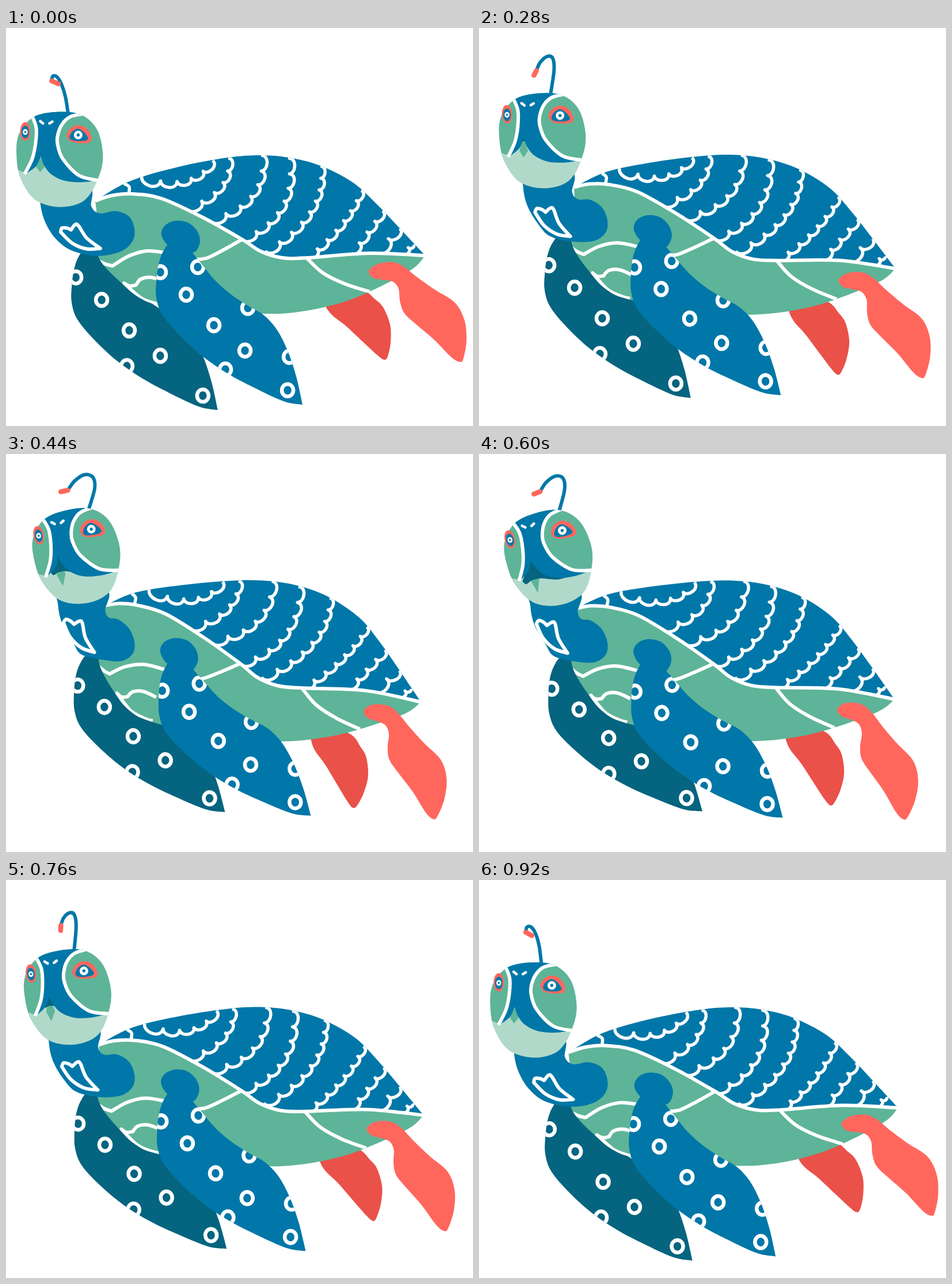
Write an HTML page with a canvas that moves like this. It is 811 by 691 pixels and loops after 960 ms.

```html
<!DOCTYPE html>
<html lang="en">
<head>
<meta charset="utf-8">
<title>Swimming turtle</title>
<style>
html, body { margin: 0; width: 100%; height: 100%; overflow: hidden; background: #fff; }
canvas { display: block; }
</style>
</head>
<body>
<canvas id="stage" width="811" height="691"></canvas>
<script>
const ctx = document.getElementById('stage').getContext('2d');
const LOOP = 960, STEP = 40;
const BLUE = '#0077a8', TEAL = '#05647f', GREEN = '#5eb498', MINT = '#b0d9ca',
      RED = '#ff675d', BRICK = '#ea5148', WHITE = '#fff';

// "x,y x,y | x,y ..." -> smooth runs of points, with corners between runs
const runs = s => s.split('|').map(r => r.trim().split(/\s+/).map(q => q.split(',').map(Number)));
const points = s => runs(s)[0];
const mapRuns = (shape, f) => shape.map(r => r.map(f));
const clamp = v => Math.max(0, Math.min(1, v));

// 0..1 swing that tops out at the given time; power narrows or widens the top
const wave = (t, peak, power = 1) => ((1 + Math.cos(2 * Math.PI * (t - peak) / LOOP)) / 2) ** power;

function trace(shape, closed) {
  const loop = closed && shape.length === 1;
  ctx.beginPath();
  shape.forEach((r, n) => {
    const last = r.length - 1;
    const at = i => loop ? r[(i + r.length) % r.length] : r[Math.max(0, Math.min(last, i))];
    if (n === 0) ctx.moveTo(...r[0]);
    for (let i = 0; i < (loop ? r.length : last); i++) {
      const [a, b, c, d] = [at(i - 1), at(i), at(i + 1), at(i + 2)];
      ctx.bezierCurveTo(b[0] + (c[0] - a[0]) / 6, b[1] + (c[1] - a[1]) / 6,
        c[0] - (d[0] - b[0]) / 6, c[1] - (d[1] - b[1]) / 6, c[0], c[1]);
    }
  });
  if (closed) ctx.closePath();
}
function fill(shape, color) { trace(shape, true); ctx.fillStyle = color; ctx.fill(); }
function line(shape, width = 6, color = WHITE, closed = false) {
  trace(shape, closed);
  ctx.lineWidth = width;
  ctx.strokeStyle = color;
  ctx.stroke();
}
function oval(x, y, rx, ry, color) {
  ctx.beginPath();
  ctx.ellipse(x, y, rx, ry, 0, 0, 7);
  ctx.fillStyle = color;
  ctx.fill();
}
function clipped(shape, draw) {
  ctx.save();
  trace(shape, true);
  ctx.clip();
  draw();
  ctx.restore();
}
// Draw in a frame where (x, y) moves to (tx, ty), turned by deg
function posed(x, y, tx, ty, deg, draw) {
  ctx.save();
  ctx.translate(tx, ty);
  ctx.rotate(deg * Math.PI / 180);
  ctx.translate(-x, -y);
  draw();
  ctx.restore();
}

// Body: everything on it is bent by one warp
const seam = points('155,300 183,291 220,288 270,296 340,328 410,367 443,388 480,399 523,399 630,391 728,395');
const back = points('728,395 684,348 642,304 602,268 548,240 497,226 445,221 385,225 300,241 215,266 155,300');
const keel = points('728,395 702,421 620,463 560,483 500,494 445,496 330,490 265,481 235,470 205,447 160,396 158,330 155,300');
const marks = [
  '160,404 173,410 185,413 | 185,413 213,396 245,387 283,391',
  '275,481 262,479 235,469 205,443 | 205,443 215,448 226,446 | 226,446 234,436 252,433 275,440',
  '330,402 350,399 378,385 410,367',
  '523,400 550,425 588,444 632,458'
].map(runs);
const nick = runs('205,270 214,276 213,289');
const shoulder = runs('270,360 275,344 292,335 314,337 331,351 337,369 331,386 318,391 300,385 282,378');
// Start, control and end of each row of scales
const rows = [
  '359,230 322,285 236,258', '386,226 392,285 311,313', '443,221 453,308 351,332',
  '490,226 506,326 409,366', '546,240 556,325 450,387', '617,282 590,345 522,399',
  '654,317 627,354 600,392', '684,348 662,362 648,391', '708,376 697,378 692,393'
].map(points);

function scales([a, c, b], bend) {
  const count = Math.max(2, Math.round(Math.hypot(a[0] - b[0], a[1] - b[1]) / 23));
  const at = u => bend([0, 1].map(i => (1 - u) ** 2 * a[i] + 2 * u * (1 - u) * c[i] + u * u * b[i]));
  let [px, py] = at(0);
  ctx.beginPath();
  ctx.moveTo(px, py);
  for (let i = 1; i <= count; i++) {
    const [x, y] = at(i / count), dx = (y - py) * .72, dy = (px - x) * .72;
    ctx.bezierCurveTo(px + dx * .8, py + dy * .8, x + dx * .6, y + dy * .6, x, y);
    [px, py] = [x, y];
  }
  ctx.lineWidth = 5.5;
  ctx.strokeStyle = WHITE;
  ctx.stroke();
}
function drawBody(p) {
  const bend = ([x, y]) => {
    const u = x - 445;
    return [x + p * .15 * (345 - y + Math.max(0, 220 - x)), y + p * (.092 * u + 4.2e-7 * u ** 3)];
  };
  const bent = s => mapRuns(s, bend);
  const shell = bent([seam, back]), belly = bent([seam, keel]);
  fill(belly, GREEN);
  fill(shell, BLUE);
  clipped(shell, () => rows.forEach(r => scales(r, bend)));
  clipped(belly, () => marks.forEach(m => line(bent(m))));
  line(bent(nick), 5.5);
  line(bent([seam]));
  fill(bent(shoulder), BLUE);
}

// Front flippers share one outline
const fin = runs('318,383 340,410 362,437 390,462 420,482 447,498 470,523 489,560 504,605 515,654 | 515,654 482,648 430,624 385,600 340,569 300,532 271,497 261,468 261,440 265,410 274,386 290,370 318,383');
const rings = points('268,424 313,463 361,516 415,560 489,629');
const nearRings = points('333,415 420,486 381,593 492,571');
const farRings = points('357,578');

function drawFin(extra, color) {
  fill(fin, color);
  clipped(fin, () => {
    ctx.lineWidth = 6.5;
    ctx.strokeStyle = WHITE;
    for (const [x, y] of [...rings, ...extra]) {
      ctx.beginPath();
      ctx.ellipse(x, y, 10, 10.8, 0, 0, 7);
      ctx.stroke();
    }
  });
}

// Hind legs
const nearLeg = runs('630,422 645,410 670,406 690,413 712,430 745,453 780,475 797,505 801,540 796,572 790,578 775,570 745,540 715,515 693,495 685,475 682,452 672,440 655,437 638,434');
const farLeg = runs('553,470 556,485 568,500 590,517 620,545 645,568 657,576 663,570 668,545 667,515 655,485 640,470 620,455 580,450');

// The hip end stays level while the rest swings
function drawNearLeg(p, kick) {
  const swing = ([x, y]) => {
    const dx = x - 630, dy = y - 422;
    const a = kick * .264 * clamp(Math.hypot(dx, dy) / 58), c = Math.cos(a), s = Math.sin(a);
    return [630 - 9 * p + dx * c - dy * s, 422 + 24 * p + dx * s + dy * c];
  };
  fill(mapRuns(nearLeg, swing), RED);
}

// Neck
const neck = runs('62,270 59,300 66,333 85,365 115,387 160,396 200,388 220,370 223,348 213,327 190,318 163,322 148,310 143,275');
const heart = runs('95,355 97,348 106,348 113,351 | 113,351 120,342 126,344 140,365 164,383 | 164,383 140,384 115,374 95,355');

function drawNeck(sway, rise) {
  const lean = ([x, y]) => [
    x + sway * 33 * clamp((200 - x) / 100 * (1.5 - (y - 310) / 85)),
    y - rise * (40 - .27 * Math.max(0, x - 160))];
  fill(mapRuns(neck, lean), BLUE);
  posed(126, 362, 126, 362 - 54 * sway, 23 * sway, () => line(heart, 6, WHITE, true));
}

// Head
const skull = runs('18,222 22,184 47,154 88,145 130,150 158,176 168,222 159,262 135,299 93,310 50,297 25,260');
const chin = runs('10,241 33,251 | 33,251 60,215 | 60,215 80,246 | 80,246 130,263 160,264 175,260 | 175,260 175,320 | 175,320 10,320 | 10,320 10,241');
const brow = runs('45,140 45,154 53,185 47,222 35,252 | 35,252 52,239 60,222 | 60,222 66,238 78,253 100,264 130,267 157,264 | 157,264 126,255 98,226 88,195 98,165 130,149 | 130,149 130,140 | 130,140 45,140');
const rimL = runs('43,148 52,172 51,200 45,227 32,253');
const rimR = runs('136,148 112,153 98,165 90,183 89,200 98,226 126,255 160,264');
const mouth = runs('60,220 37,256 | 37,256 42,262 52,258 | 52,258 69,258 100,267 130,265 | 130,265 60,220');
const tongue = runs('59,222 52,240 | 52,240 59,249 | 59,249 67,240 | 67,240 59,222');
const eyeRed = runs('105,186 112,173 127,168 141,175 148,190 144,198 128,199 112,196');
const eyeBlue = runs('110,190 114,180 125,174 136,181 142,191 136,195 118,195');

function drawHead(open) {
  fill(skull, GREEN);
  clipped(skull, () => {
    fill(chin, MINT);
    fill(mapRuns(tongue, ([x, y]) => [x, 240 + 18 * open + (y - 240) * (1 + 1.6 * open)]), GREEN);
    fill(mapRuns(mouth, ([x, y]) => [60 + (x - 60) * open, 220 + (y - 220) * open]), TEAL);
    fill(brow, BLUE);
    line(rimL);
    line(rimR);
  });
  ctx.lineCap = 'round';
  line(runs('59,161 64,165'), 4.5);
  line(runs('75,165 80,162'), 4.5);
  ctx.lineCap = 'butt';
  oval(33, 179, 9, 16, RED);
  oval(33, 180, 6.5, 11, BLUE);
  oval(33, 180, 4.3, 5, WHITE);
  oval(33, 180, 1.7, 1.9, BLUE);
  fill(eyeRed, RED);
  fill(eyeBlue, BLUE);
  oval(125, 185, 7.5, 7.5, WHITE);
  oval(125, 185, 2.7, 2.7, BLUE);
}

// Feeler: curled, halfway and stretched, base to tip
const [curled, halfway, stretched] = [
  '108,150 103,120 96,98 88,85 81,84 79,92 91,97',
  '119,122 123,80 120,59 111,56 101,65 96,78 95,87',
  '144,99 156,60 153,40 138,35 120,46 108,62 95,64'
].map(points);

function drawFeeler(u) {
  const q = curled.map((a, i) => a.map((v, c) =>
    2 * (u - .5) * (u - 1) * v + 4 * u * (1 - u) * halfway[i][c] + 2 * u * (u - .5) * stretched[i][c]));
  line([q.slice(0, 6)], 6, BLUE);
  ctx.lineCap = 'round';
  line([q.slice(5)], 8.5, RED);
  ctx.lineCap = 'butt';
}

function draw(t) {
  const bob = wave(t, 480) * 1.015, paddle = wave(t, 620), kick = wave(t, 553, 1.1);
  const sway = wave(t, 510), rise = wave(t, 495, .85), tilt = wave(t, 565, 1.6);
  ctx.fillStyle = WHITE;
  ctx.fillRect(0, 0, 811, 691);
  ctx.lineJoin = 'round';

  posed(600, 440, 600 - 15 * bob, 440 + 28 * bob, 16 * bob, () => fill(farLeg, BRICK));
  posed(314, 463, 165.2 + 9.6 * paddle, 472 - 33 * bob, 1.05 - 4.9 * paddle, () => drawFin(farRings, TEAL));
  drawBody(bob);
  posed(303, 362, 303, 362 - 14.8 * bob, -2.9 * bob, () => drawFin(nearRings, BLUE));
  drawNearLeg(bob, kick);
  drawNeck(sway, rise);
  drawFeeler(rise);
  posed(93, 228, 93 + 33 * sway, 229 - 52 * rise, .3 - 13.9 * tilt, () => drawHead(tilt));
}

const start = performance.now();
function tick() {
  const t = (performance.now() - start) % LOOP;
  draw(Math.floor(t / STEP) * STEP);
  requestAnimationFrame(tick);
}
tick();
</script>
</body>
</html>
```
